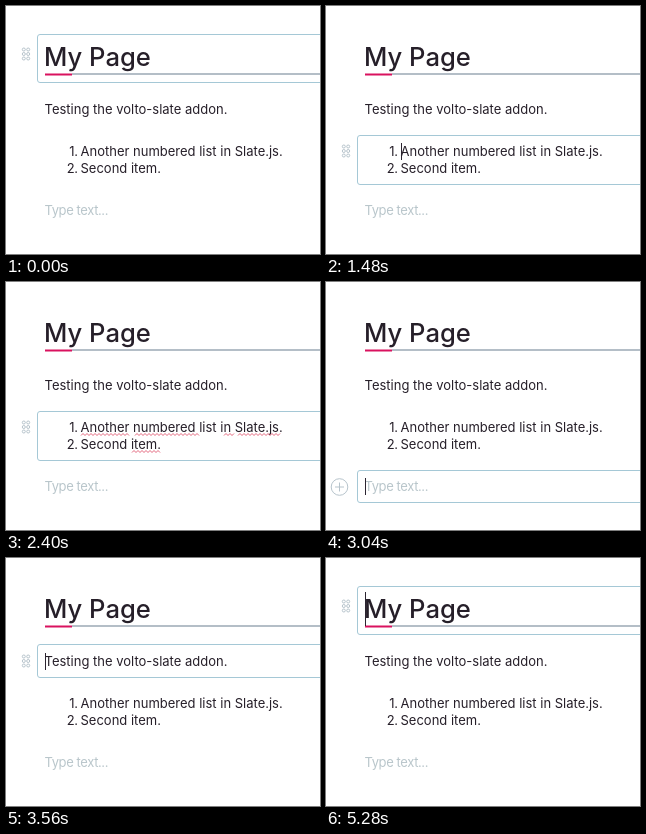
An HTML page that plays this animation: 314x248 px, repeating every 5520 ms.

```html
<!DOCTYPE html>
<html lang="en">
<head>
<meta charset="utf-8">
<title>Editor block navigation</title>
<style>
  html, body { margin: 0; width: 100%; height: 100%; overflow: hidden; background: #fff; }
  svg { display: block; width: 314px; height: 248px; }
  text { font: 400 13px Inter, "Open Sans", sans-serif; fill: #261f29; }
  .title { font-size: 25.6px; font-weight: 500; }
  .placeholder { fill: #b9c6cb; letter-spacing: -.4px; }
  .number { text-anchor: end; letter-spacing: -.4px; }
  .frame { fill: none; stroke: #a5c8d6; }
  .icon { fill: none; stroke: #b7c4cc; }
  .wave { fill: none; stroke: #e0566f; stroke-width: .9; }
</style>
</head>
<body>
<svg viewBox="0 0 314 248">
  <rect x="66" y="67" width="248" height="2" fill="#b4bec7"/>
  <rect x="39" y="67.5" width="27" height="2" fill="#d9125f"/>
  <text class="title" x="38" y="60">My Page</text>
  <text x="38.5" y="108">Testing the volto-slate addon.</text>
  <text class="number" x="71.5" y="150">1.</text>
  <text x="74.5" y="150">Another numbered list in Slate.js.</text>
  <text class="number" x="71.5" y="167">2.</text>
  <text x="74.5" y="167">Second item.</text>
  <text class="placeholder" x="38.5" y="209">Type text...</text>
  <path id="waves" class="wave"/>
  <rect id="frame" class="frame" x="31.5" width="320" rx="2.5"/>
  <g id="handle" class="icon"></g>
  <g id="plus" class="icon">
    <circle cx="13.5" cy="205" r="8.3"/>
    <path d="M9 205h9M13.5 200.5v9"/>
  </g>
  <rect id="caret" width="1" fill="#2b2430"/>
</svg>
<script>
const LOOP = 5520, BLINK = 600, SPELL_DELAY = 160;
const byId = id => document.getElementById(id);
const set = (el, attrs) => Object.entries(attrs).forEach(([k, v]) => el.setAttribute(k, v));
const show = (el, on) => el.setAttribute("visibility", on ? "visible" : "hidden");

const blocks = {
  title: { top: 28.5, bottom: 76.5, handle: 48 },
  paragraph: { top: 86.5, bottom: 119.5, handle: 103 },
  list: { top: 129.5, bottom: 178.5, handle: 145 },
  empty: { top: 188.5, bottom: 220.5 }
};

// Each step is one arrow key press: time, focused block, caret x, y and height.
const step = (at, block, x, y, height) => ({ at, block, x, y, height });
const steps = [
  step(-560, "title", 39, 34, 34),
  step(1120, "paragraph", 39, 95, 17),
  step(1480, "list", 75, 137, 17),
  step(1760, "list", 75, 154, 17),
  step(2480, "empty", 39, 196, 17),
  step(3120, "list", 75, 154, 17),
  step(3320, "list", 75, 137, 17),
  step(3480, "paragraph", 39, 95, 17),
  step(4080, "title", 39, 34, 34)
];

const wave = ([from, to, y]) => {
  let d = `M${from} ${y}`;
  for (let x = from + 2, up = true; x <= to; x += 2, up = !up) d += `L${x} ${up ? y - 2 : y}`;
  return d;
};
set(byId("waves"), {
  d: [[75, 124, 153.5], [129, 194, 153.5], [218, 228, 153.5], [232, 274, 153.5], [126, 154, 170.5]].map(wave).join("")
});

byId("handle").innerHTML = [-4.5, 0, 4.5].flatMap(y =>
  [17.8, 22.2].map(x => `<circle cx="${x}" cy="${y}" r="1.5"/>`)).join("");

function caretVisible(t, current) {
  // The opening state starts one tick before the caret turns on.
  if (t < 1120) return t >= 40 && t < 640;
  return Math.floor((t - current.at) / BLINK) % 2 === 0;
}

function render(t) {
  const current = steps.filter(s => s.at <= t).pop();
  const block = blocks[current.block];
  const isEmpty = current.block === "empty";
  set(byId("frame"), { y: block.top, height: block.bottom - block.top });
  show(byId("handle"), !isEmpty);
  show(byId("plus"), isEmpty);
  if (!isEmpty) set(byId("handle"), { transform: `translate(0 ${block.handle})` });
  set(byId("caret"), { x: current.x, y: current.y, height: current.height });
  show(byId("caret"), caretVisible(t, current));

  const entered = steps.find((s, i) => s.block === "list" && steps[i - 1].block !== "list"
    && s.at <= t && t - s.at < 1000);
  show(byId("waves"), current.block === "list" && entered && t - entered.at >= SPELL_DELAY);
}

const start = performance.now();
function tick() {
  render((performance.now() - start) % LOOP);
  requestAnimationFrame(tick);
}
tick();
</script>
</body>
</html>
```
